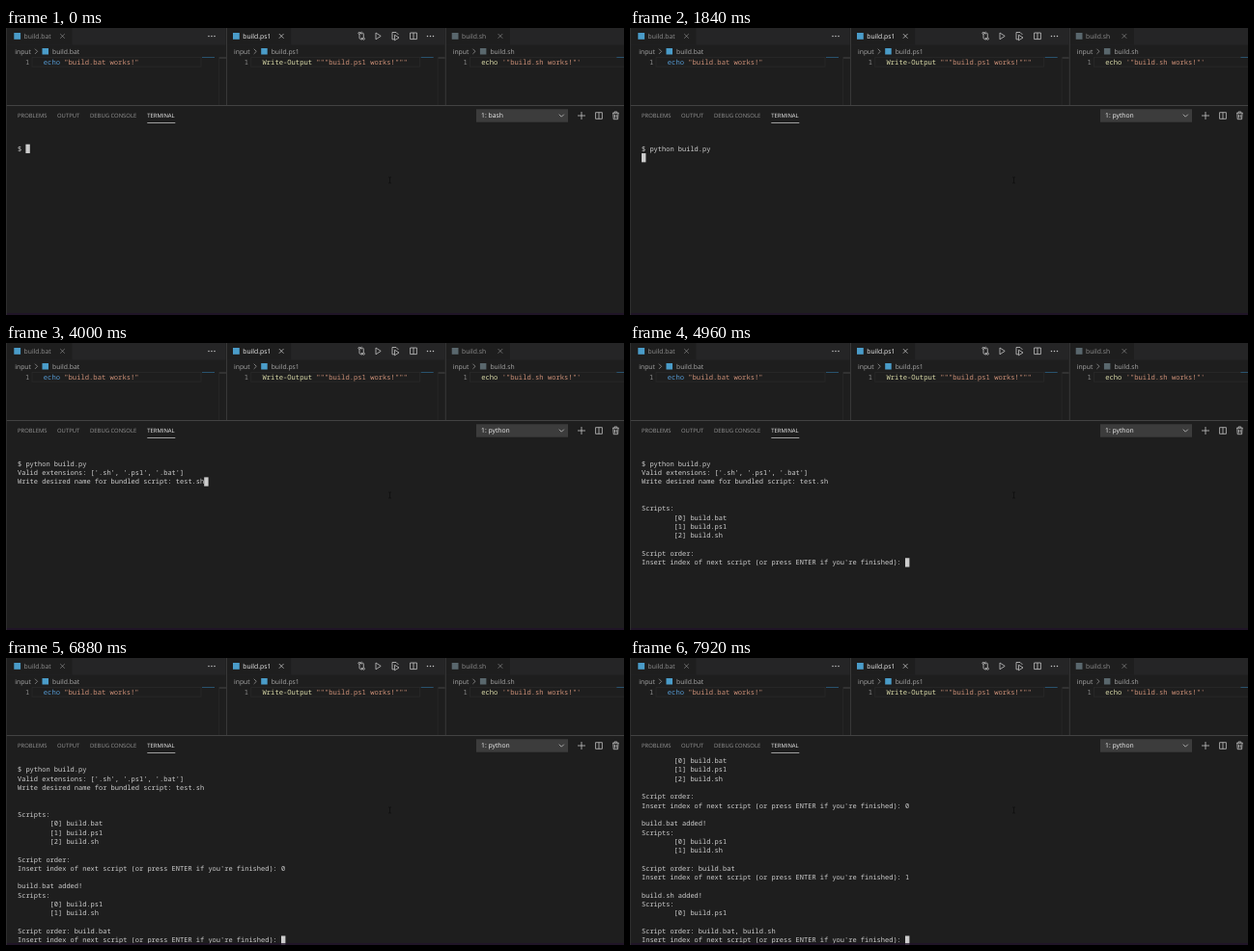
Recreate the animation shown at these times as an HTML page. Size 640 px wide and 298 px high, loop 8000 ms.

```html
<!DOCTYPE html>
<html lang="en">
<head>
<meta charset="utf-8">
<title>Bundling scripts in a terminal</title>
<style>
  html, body { margin: 0; width: 100%; height: 100%; overflow: hidden; background: #1e1e1e; }
  svg { display: block; width: 100%; height: 100%; }
  text { white-space: pre; text-rendering: geometricPrecision; font: 6.8px "Open Sans", "Noto Sans", sans-serif; fill: #a9a9a9; }
  .code text { font: 7.17px "Noto Sans Mono", "DejaVu Sans Mono", monospace; }
  #term text { font: 7px "Noto Sans Mono", "DejaVu Sans Mono", monospace; fill: #d0d0d0; }
  .panel text { font-size: 5.9px; fill: #969696; }
  .panel .on, .focus .name { fill: #f0f0f0; }
  .name { fill: #8f8f8f; }
  .code .num { fill: #8c8c8c; }
  .key { fill: #569cd6; }
  .fn { fill: #dcdcaa; }
  .str { fill: #ce9178; }
  .icon { fill: none; stroke: #c5c5c5; stroke-width: .8; }
  .dots { fill: #c5c5c5; }
</style>
</head>
<body>
<svg viewBox="0 0 640 298" preserveAspectRatio="none">
  <defs>
    <g id="dots" class="dots"><circle cx="-3" r=".75"/><circle r=".75"/><circle cx="3" r=".75"/></g>
    <path id="split" class="icon" d="M-3.4-3.3H3.4V3.3H-3.4ZM0-3.3V3.3"/>
  </defs>
  <rect width="640" height="298" fill="#1e1e1e"/>
  <rect width="640" height="17.5" fill="#252526"/>
  <g id="editors"></g>
  <path d="M228.5 0V80M455.3 0V80" stroke="#3f3f3f" stroke-width=".8"/>

  <use href="#dots" x="213" y="8.5"/>
  <use href="#dots" x="439.5" y="8.5"/>
  <use href="#split" x="422" y="8.3"/>
  <g class="icon">
    <path d="M366 6.5V10.5Q366 11.3 367 11.3H369M368 10L369.3 11.3L368 12.6M370.3 10V6Q370.3 5.2 369.3 5.2H367.3M368.4 4L367.1 5.2L368.4 6.5"/>
    <circle cx="365.9" cy="5.4" r="1"/><circle cx="370.4" cy="11.2" r="1"/>
    <path d="M383 5L388.2 8.4L383 11.8Z"/>
    <path d="M402 11.8H400V4.5H404L406 6.5V7M402.5 7.2L407 10L402.5 12.8Z"/>
  </g>

  <path d="M0 80.5H640" stroke="#424242"/>
  <g class="panel">
    <text x="12" y="93.2">PROBLEMS</text>
    <text x="53" y="93.2">OUTPUT</text>
    <text x="87" y="93.2">DEBUG CONSOLE</text>
    <text x="146.3" y="93.2" class="on">TERMINAL</text>
  </g>
  <path d="M146.3 98.5H175.3" stroke="#d8d8d8" stroke-width=".7"/>
  <rect x="487" y="84.3" width="95" height="13.4" fill="#3c3c3c"/>
  <text id="shell" x="492" y="93.4" style="fill:#f0f0f0"></text>
  <g class="icon">
    <path d="M572.8 89.7L575.3 92.2L577.8 89.7M592 91H600M596 87V95"/>
    <path d="M628 88.3H634.8M630 88V87H632.8V88M628.8 88.5L629.2 94.7H633.6L634 88.5M630.5 89.8V93.4M632.3 89.8V93.4"/>
  </g>
  <use href="#split" x="614" y="91"/>

  <g id="term"></g>
  <path d="M396 155H399M397.5 155V161M396 161H399" fill="none" stroke="#0c0c0c" stroke-width=".7"/>
  <rect y="296" width="640" height="2" fill="#21122a" opacity=".75"/>
  <path d="M.5 0V298" stroke="#333" stroke-width=".8"/>
</svg>
<script>
const LOOP = 8000, ROWS = 21, TOP = 102.1, LINE = 9.32, LEFT = 12, CHAR = 4.2;
const $ = id => document.getElementById(id);

function editor({ x, file, color, code, focus, map }) {
  const badge = (bx, by, s) => `<rect x="${bx}" y="${by}" width="${s}" height="${s}" fill="${color}"/>`;
  return `<g transform="translate(${x})" class="${focus ? 'focus' : ''}">
    <rect x="1" width="67.5" height="17.5" fill="#1e1e1e"/>
    ${badge(8.3, 5, 6.8)}
    <text class="name" x="18.6" y="10.9">${file}</text>
    <path class="icon" d="M56.2 6.1L60.8 10.7M60.8 6.1L56.2 10.7" opacity="${focus ? 1 : .55}"/>
    <text x="9.3" y="26.7">input</text>
    <path class="icon" d="M30 21.7L32.6 24.3L30 26.9" opacity=".7"/>
    ${badge(37.5, 21, 6.5)}
    <text x="48" y="26.7">${file}</text>
    <rect x="27" y="30.5" width="175" height="9.6" fill="none" stroke="#292929" stroke-width=".8"/>
    <path d="M${map} 30.5H${map + 13}" stroke="#2b5878" stroke-width=".9"/>
    <path d="M220.5 30V80" stroke="#292929" stroke-width=".8"/>
    <path d="M221 31H228" stroke="#4a4a4a" stroke-width=".9"/>
    <g class="code"><text class="num" x="20" y="37.6">1</text><text x="38.8" y="37.6">${code}</text></g>
  </g>`;
}

const span = (cls, s) => `<tspan class="${cls}">${s}</tspan>`;
$('editors').innerHTML = [
  { x: 0, file: 'build.bat', color: '#4a9cc9', map: 203,
    code: span('key', 'echo') + span('str', ' "build.bat works!"') },
  { x: 226.7, file: 'build.ps1', color: '#4a9cc9', map: 203, focus: true,
    code: span('fn', 'Write-Output') + span('str', ' """build.ps1 works!"""') },
  { x: 453.4, file: 'build.sh', color: '#59676d', map: 179,
    code: span('fn', 'echo') + span('str', ` '"build.sh works!"'`) }
].map(editor).join('');

const menu = (order, ...files) => 'Scripts:\n' +
  files.map((f, i) => `        [${i}] ${f}\n`).join('') +
  `\nScript order:${order}\n` +
  "Insert index of next script (or press ENTER if you're finished): ";

// Each step adds its text to the terminal from the given time on.
const steps = [
  [0, '\n\n$ '],
  [640, 'py'], [720, 'tho'], [800, 'n '],
  [1120, 'build.py '],
  [1680, '\n'],
  [1920, "Valid extensions: ['.sh', '.ps1', '.bat']\nWrite desired name for bundled script: "],
  [3200, 'te'], [3360, 'st'], [3600, '.'], [3680, 's'], [3760, 'h'],
  [4960, '\n\n\n' + menu('', 'build.bat', 'build.ps1', 'build.sh')],
  [6400, '0'],
  [6880, '\n\nbuild.bat added!\n' + menu(' build.bat', 'build.ps1', 'build.sh')],
  [7680, '1'],
  [7920, '\n\nbuild.sh added!\n' + menu(' build.bat, build.sh', 'build.ps1')]
];

let shown = null;
function draw() {
  const t = performance.now() % LOOP;
  $('shell').textContent = t < 1760 ? '1: bash' : '1: python';
  const out = steps.filter(s => s[0] <= t).map(s => s[1]).join('');
  if (out !== shown) {
    shown = out;
    const lines = out.split('\n').slice(-ROWS), last = lines.length - 1;
    $('term').innerHTML = lines.map((s, i) =>
      `<text x="${LEFT}" y="${TOP + i * LINE + 6.9}">${s}</text>`).join('') +
      `<rect x="${LEFT + lines[last].length * CHAR}" y="${TOP + last * LINE}" width="4.4" height="9.3" fill="#ccc"/>`;
  }
  requestAnimationFrame(draw);
}
draw();
</script>
</body>
</html>
```
